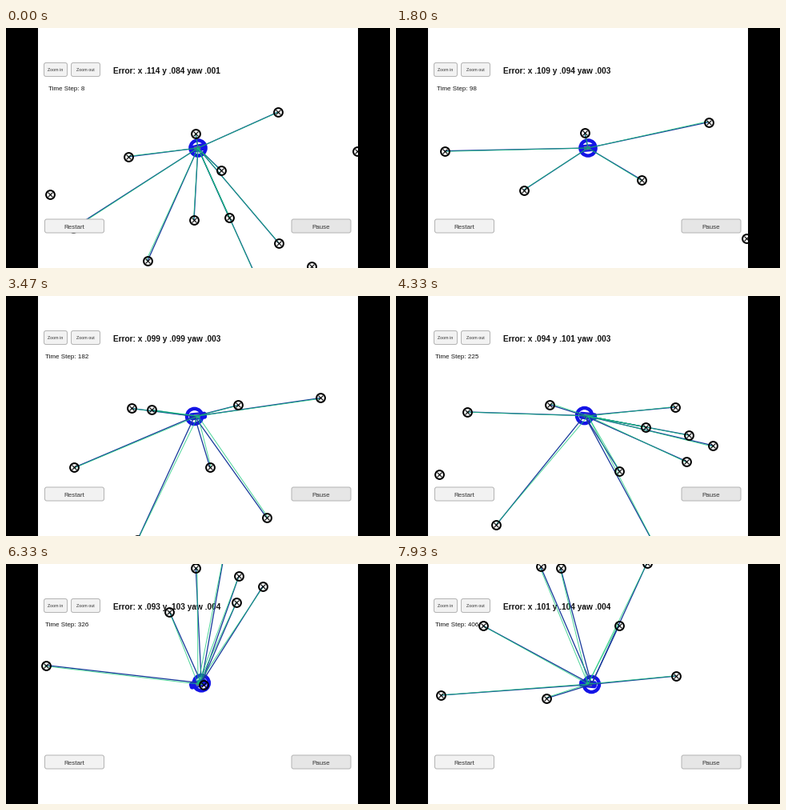
A matplotlib script for the animation above (8 s loop, 480 px wide and 300 px high).

```python
import numpy as np
import matplotlib.pyplot as plt
from matplotlib.animation import FuncAnimation
from matplotlib.collections import LineCollection
from matplotlib.patches import Circle, FancyBboxPatch, Rectangle
from matplotlib.transforms import Affine2D

W, H, DPI = 480, 300, 100
LOOP, TICKS, HOLD = 8000, 360, 3      # the picture changes every third tick
PX = 72 / DPI
CAR = np.array([240, 150])
BLUE = "#1414e6"
SENSOR = 192

# Landmarks on the map, in pixels
MARKS = np.array([
    (237, 132), (340, 105), (439, 154), (269, 178), (279, 237), (341, 269),
    (382, 298), (235, 240), (177, 291), (153, 161), (55, 208), (315, 316),
    (84, 250), (515, 82), (586, 141), (670, 69), (842, 53), (867, 55),
    (770, 127), (717, 214), (849, 218), (975, 49), (1078, 40), (1235, 43),
    (1198, 68), (1252, 78), (1282, 91), (1249, 111), (1165, 123),
    (1011, 190), (940, 127), (1208, 214)])

# Key points of the drive: seconds and map shift
KEYS = np.array([(0, 0, 0), (1.07, -140, 33), (2.6, -458, 63),
                 (4.33, -885, 96), (5.27, -1000, 61), (5.6, -1016, 10),
                 (6.07, -991, -47), (7, -848, -70), (7.93, -662, -50)])
KEY_T, SHIFT = KEYS[:, 0], KEYS[:, 1:]
SLOPE = np.gradient(SHIFT, KEY_T, axis=0)


def scroll(t):
    """Cubic Hermite interpolation of the map shift."""
    k = int(np.clip(np.searchsorted(KEY_T, t, "right") - 1, 0, len(KEY_T) - 2))
    h = KEY_T[k + 1] - KEY_T[k]
    u = (t - KEY_T[k]) / h
    v = 1 - u
    return (v * v * ((1 + 2 * u) * SHIFT[k] + u * h * SLOPE[k])
            + u * u * ((1 + 2 * v) * SHIFT[k + 1] - v * h * SLOPE[k + 1]))


def readout(t):
    """Time step and error line: x swings, y settles, yaw creeps up."""
    x = 0.103 + 0.011 * np.cos(2 * np.pi * t / 11)
    y = 0.105 - 0.021 * np.exp(-t / 2.8)
    yaw = 0.001 + 0.003 * np.cbrt(t / 8)
    x, y, yaw = (f"{e:.3f}"[1:] for e in (x, y, yaw))
    return f"Time Step: {round(8 + 50.17 * t)}", f"Error: x {x} y {y} yaw {yaw}"


plt.rcParams["font.family"] = "Liberation Sans"
fig = plt.figure(figsize=(W / DPI, H / DPI), dpi=DPI, facecolor="white")
ax = fig.add_axes([0, 0, 1, 1])
ax.set_xlim(0, W)
ax.set_ylim(H, 0)
ax.axis("off")


def label(x, y, text, size, ha="center", z=1, **kw):
    return ax.text(x, y, text, fontsize=size * PX, ha=ha, va="baseline", zorder=z, **kw)


def button(x, y, w, h, text, size, base, fill="#f2f2f2"):
    ax.add_patch(FancyBboxPatch((x + 2, y + 2), w - 4, h - 4,
                                boxstyle="round,pad=1.5,rounding_size=2.5",
                                fc=fill, ec="#b4b4b4", lw=PX, zorder=10))
    label(x + w / 2, base, text, size, z=11, color="#333333")


button(47, 43, 30, 18, "Zoom in", 5.2, 54)
button(81, 43, 37, 18, "Zoom out", 5.4, 54)
button(48, 238.5, 75, 18, "Restart", 8, 250.6)
button(356.5, 238.5, 75, 18, "Pause", 8, 250.6, "#e6e6e6")

for x in (0, 440):
    ax.add_patch(Rectangle((x, 0), 40, H, fc="black", ec="none", zorder=20))

error_text = label(133.5, 56.8, "", 10.1, ha="left", weight="bold", color="#111111")
step_text = label(76, 78, "", 8, color="#111111")

ring = Circle(CAR, 9.6, fc="none", ec=BLUE, lw=4.4 * PX, zorder=3)
body = FancyBboxPatch((-9, -2.5), 18, 5, boxstyle="round,pad=2,rounding_size=3",
                      fc=BLUE, ec="none", zorder=2.5)
glass = Rectangle((-5, -2.5), 8, 5, fc="#5c6f9c", ec="none", zorder=2.6)
for patch in (ring, body, glass):
    ax.add_patch(patch)

blue_lines = LineCollection([], colors="#1a3c9c", linewidths=1.3 * PX, zorder=4)
green_lines = LineCollection([], colors="#14c878", linewidths=PX, alpha=0.75, zorder=5)
ax.add_collection(blue_lines)
ax.add_collection(green_lines)
circles, = ax.plot([], [], "o", ms=10.8 * PX, mfc="none", mec="black", mew=2 * PX, zorder=6)
crosses, = ax.plot([], [], "x", ms=6.6 * PX, mec="black", mew=1.1 * PX, zorder=6)


def rays(start, ends):
    return [(start, end) for end in ends]


def draw(tick):
    i = (tick + 1) // HOLD
    t = i * HOLD * LOOP / TICKS / 1000
    drift = scroll(t + 0.005) - scroll(t - 0.005)
    drift /= np.hypot(*drift)

    # The estimate trails the car on two pictures out of three
    guess = CAR + drift * (4.4 if i % 3 else 0)
    ring.center = guess
    turn = Affine2D().rotate(np.arctan2(-drift[1], -drift[0])).translate(*CAR)
    for part in (body, glass):
        part.set_transform(turn + ax.transData)

    pos = MARKS + scroll(t)
    near = pos[np.hypot(*(pos - CAR).T) < SENSOR]
    noise = np.random.default_rng(i).normal(0, 0.8, near.shape)
    blue_lines.set_segments(rays(guess, near))
    green_lines.set_segments(rays(CAR, near + noise))
    seen = pos[np.abs(pos[:, 0] - CAR[0]) < 210]
    circles.set_data(*seen.T)
    crosses.set_data(*seen.T)

    for artist, text in zip((step_text, error_text), readout(t)):
        artist.set_text(text)
    return blue_lines, green_lines, circles, crosses, ring, body, step_text, error_text


ani = FuncAnimation(fig, draw, frames=TICKS, interval=LOOP / TICKS,
                    repeat=True, repeat_delay=0, blit=False)
plt.show()
```
